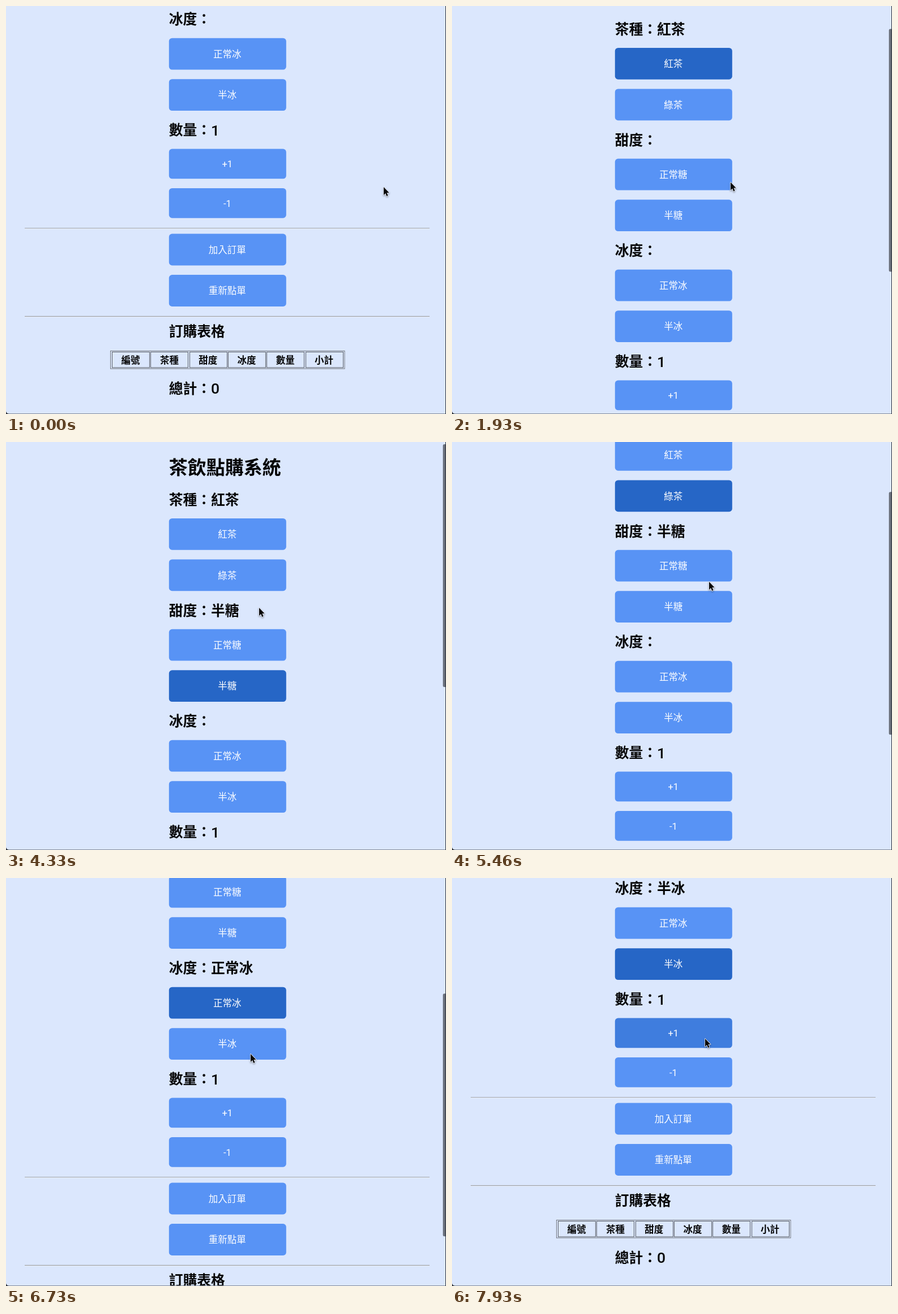
Animation, 777 px wide and 721 px high, one loop 8 s. Source, as an HTML page with a canvas:

```html
<!DOCTYPE html>
<html lang="zh-Hant">
<head>
<meta charset="utf-8">
<title>茶飲點購系統</title>
<style>
html, body { margin: 0; width: 100%; height: 100%; overflow: hidden; background: #dbe7fd; }
canvas { display: block; width: 777px; height: 721px; }
</style>
</head>
<body>
<canvas id="stage" width="777" height="721" lang="zh-Hant"></canvas>
<script>
const ctx = document.getElementById('stage').getContext('2d');
const LOOP = 8000;
const FONT = 'Roboto, "Noto Sans CJK TC", "Noto Sans CJK", sans-serif';
const INK = '#050505', LEFT = 287.8;
const GAP = 16.7, GROUP_STEP = 195.9;
const BASE = [88, 147, 245], DARK = [38, 102, 198];
const FADE = 130, HOVER_LEAD = 220;

const GROUPS = [
  { label: '茶種：', options: ['紅茶', '綠茶'] },
  { label: '甜度：', options: ['正常糖', '半糖'] },
  { label: '冰度：', options: ['正常冰', '半冰'] },
  { label: '數量：', options: ['+1', '-1'], value: '1' }
];

const CLICKS = [
  { at: 870, text: '紅茶' },
  { at: 2500, text: '正常糖' },
  { at: 3600, text: '半糖' },
  { at: 4840, text: '綠茶' },
  { at: 5990, text: '正常冰' },
  { at: 7460, text: '半冰' },
  { at: LOOP, text: '+1' }
];

// each move eases to its goal between two times
const move = (from, to, ...goal) => ({ from, to, goal });
const SCROLLS = [
  move(10, 340, -7), move(1270, 1900, 61), move(2800, 3043, 132),
  move(4000, 4300, 0), move(5140, 5720, 242), move(6580, 6932, 475)
];
const POINTS = [
  move(400, 860, 440, 172), move(1330, 1920, 492, 311.5), move(2220, 2500, 447, 293),
  move(4560, 4800, 454, 247), move(5500, 5730, 432, 311), move(6900, 7330, 440, 154),
  move(7750, 7920, 447, 284)
];

const ramp = (t, start, len = FADE) => Math.max(0, Math.min(1, (t - start) / len));
const ease = p => p * p * (3 - 2 * p);

function follow(moves, origin, t) {
  return moves.reduce((pos, m) => {
    const p = ease(ramp(t, m.from, m.to - m.from));
    return pos.map((v, i) => v + (m.goal[i] - v) * p);
  }, origin);
}

// 0 is idle, 0.5 hovered, 1 focused
function pressLevel(text, t) {
  const i = CLICKS.findIndex(c => c.text === text);
  if (i < 0) return 0;
  const { at } = CLICKS[i], next = CLICKS[i + 1];
  const level = (ramp(t, at - HOVER_LEAD) + ramp(t, at)) / 2;
  return next ? level * (1 - ramp(t, next.at)) : level;
}

function chosen(group, t) {
  const hit = CLICKS.filter(c => c.at + FADE <= t && group.options.includes(c.text)).pop();
  return hit ? hit.text : group.value;
}

// text centred vertically on y
function write(text, x, y, size, weight, color = INK, align = 'left') {
  ctx.font = `${weight} ${size}px ${FONT}`;
  ctx.fillStyle = color;
  ctx.textAlign = align;
  ctx.fillText(text, x, y + size * 0.35);
  return ctx.measureText(text).width;
}

function roundBox(x, y, w, h, r) {
  ctx.beginPath();
  ctx.roundRect(x, y, w, h, r);
  ctx.fill();
}

function drawButton(text, y, t) {
  const h = /\d/.test(text) ? 52.7 : 55.8;
  const level = pressLevel(text, t);
  ctx.fillStyle = `rgb(${BASE.map((c, i) => Math.round(c + (DARK[i] - c) * level))})`;
  roundBox(LEFT, y, 207, h, 5.5);
  write(text, LEFT + 103, y + h / 2 + 0.5, 16.5, 400, '#fff', 'center');
  return y + h + GAP;
}

function drawButtons(texts, y, t) {
  texts.reduce((top, text) => drawButton(text, top, t), y);
}

function drawHead(label, value, y) {
  const w = write(label, LEFT, y, 24.75, 700);
  if (!value) return;
  const digit = /\d/.test(value);
  write(value, LEFT + w, y, digit ? 26.5 : 24.75, digit ? 500 : 700);
}

function drawRule(y) {
  ctx.fillStyle = '#9b9ea4';
  ctx.fillRect(33, y, 715, 1.1);
  ctx.fillStyle = '#e8edf5';
  ctx.fillRect(33, y + 1.1, 715, 1);
}

function drawTable(y) {
  ctx.lineWidth = 1;
  ctx.strokeStyle = '#74787f';
  ctx.strokeRect(184.5, y + 0.5, 413.5, 31.5);
  ctx.strokeStyle = '#585c63';
  ['編號', '茶種', '甜度', '冰度', '數量', '小計'].forEach((name, i) => {
    const x = 187.5 + i * 68.3;
    ctx.strokeRect(Math.floor(x) + 0.5, y + 2.5, 66, 27.5);
    write(name, x + 32.6, y + 16.8, 16.5, 700, INK, 'center');
  });
}

// the bar shows while scrolling and fades out a little later
function drawBar(t, scroll) {
  const last = SCROLLS.filter(m => m.from <= t).pop();
  if (!last) return;
  const alpha = 0.52 * (1 - ramp(t, last.to + 560));
  ctx.fillStyle = `rgba(0,0,0,${alpha})`;
  roundBox(771.6, Math.max(0, 4 + scroll * 0.6), 6, 429, 2.5);
}

function drawPointer(x, y) {
  const outline = [[0, 0], [0, 15.5], [3.6, 12.2], [6, 17.8], [8.7, 16.6], [6.3, 11.2], [11, 11]];
  ctx.save();
  ctx.translate(x, y);
  ctx.scale(0.87, 0.9);
  ctx.beginPath();
  outline.forEach(p => ctx.lineTo(...p));
  ctx.closePath();
  ctx.shadowColor = 'rgba(0,0,0,.4)';
  ctx.shadowBlur = 3;
  ctx.shadowOffsetY = 1.5;
  ctx.strokeStyle = '#e9eefa';
  ctx.lineWidth = 1.8;
  ctx.lineJoin = 'round';
  ctx.stroke();
  ctx.shadowColor = 'transparent';
  ctx.fillStyle = '#080808';
  ctx.fill();
  ctx.restore();
}

function drawPage(t) {
  write('茶飲點購系統', LEFT, 45, 33, 700);
  GROUPS.forEach((group, i) => {
    const y = i * GROUP_STEP;
    drawHead(group.label, chosen(group, t), y + 102);
    drawButtons(group.options, y + 134.9, t);
  });
  drawRule(862.2);
  drawButtons(['加入訂單', '重新點單'], 872.6, t);
  drawRule(1017.9);
  drawHead('訂購表格', '', 1045);
  drawTable(1079);
  drawHead('總計：', '0', 1146);
}

function draw(t) {
  const [scroll] = follow(SCROLLS, [470], t);
  ctx.fillStyle = '#2b3038';
  ctx.fillRect(0, 0, 777, 721);
  ctx.fillStyle = '#dbe7fd';
  roundBox(0, 0, 776, 720.5, [0, 0, 0, 5]);

  ctx.save();
  ctx.beginPath();
  ctx.rect(0, 0, 776, 720);
  ctx.clip();
  ctx.save();
  ctx.translate(0, -Math.round(scroll));
  drawPage(t);
  ctx.restore();
  drawBar(t, scroll);
  ctx.restore();
  drawPointer(...follow(POINTS, [667, 320], t));
}

const start = performance.now();
function tick() {
  draw((performance.now() - start) % LOOP);
  requestAnimationFrame(tick);
}
tick();
</script>
</body>
</html>
```
